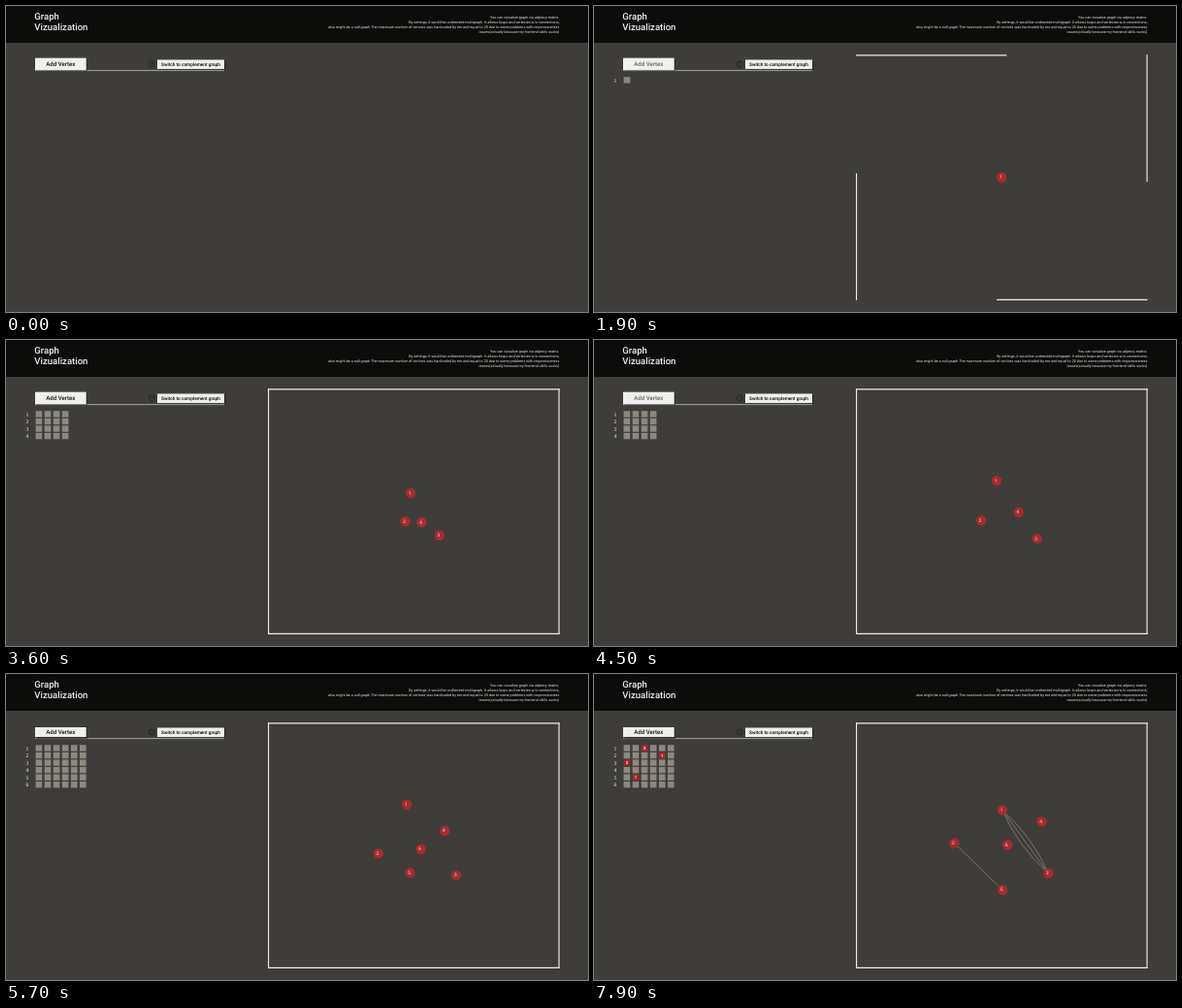
Recreate the animation shown at these times as an HTML page. Size 600 px wide and 316 px high, loop 8 s.

```html
<!DOCTYPE html>
<html lang="en">
<head>
<meta charset="utf-8">
<title>Graph Vizualization</title>
<style>
html, body { margin: 0; width: 100%; height: 100%; overflow: hidden; background: #3e3d39; }
svg { display: block; width: 100vw; height: 100vh; font-family: Roboto, sans-serif; text-rendering: geometricPrecision; }
.title { font-size: 9.55px; font-weight: 500; fill: #eee; }
.about { font-size: 3.77px; fill: #e4e4e2; text-anchor: end; }
.button text { text-anchor: middle; font-weight: 500; }
.shadow { fill: #1c1b19; opacity: .5; }
.index { font: 5.6px "Liberation Serif", serif; fill: #f4f4f0; text-anchor: middle; }
.cell { fill: #8b8880; }
.cell.on { fill: #a8262c; }
.value { font-size: 4px; font-weight: 700; fill: #fff; text-anchor: middle; }
.node circle { fill: #a92a2f; }
.node text { font-size: 4.8px; fill: #f4e6e2; text-anchor: middle; }
.edge { fill: none; stroke: #aaa9a3; stroke-width: .5; }
.frame { fill: none; stroke: #efeee7; stroke-width: 1.15; }
</style>
</head>
<body>
<svg id="stage" viewBox="0 0 600 316" preserveAspectRatio="none"></svg>
<script>
const LOOP = 8000, SPREAD_END = 5900, LINK_START = 6700, LINK_END = 7900;
const stage = document.getElementById('stage');

function add(parent, tag, attrs = {}, text = '') {
  const el = document.createElementNS('http://www.w3.org/2000/svg', tag);
  for (const key in attrs) el.setAttribute(key, attrs[key]);
  el.textContent = text;
  return parent.appendChild(el);
}
const show = (el, on) => el.setAttribute('visibility', on ? 'visible' : 'hidden');
const clamp = (v, max = 1) => Math.min(max, Math.max(0, v));
const mix = (a, b, k) => a.map((v, i) => v + (b[i] - v) * k);

// Header
add(stage, 'rect', { width: 600, height: 38, fill: '#0c0c0b' });
add(stage, 'rect', { y: 315, width: 600, height: 1, fill: '#443f47' });
['Graph', 'Vizualization'].forEach((line, i) =>
  add(stage, 'text', { x: 29.3, y: 13.8 + i * 11.6, class: 'title' }, line));
[
  'You can vizualize graph via adjency matrix.',
  'By settings, it would be undirected multigraph. It allows loops and vertecies w/o connections,',
  'also might be a null graph.The maximum number of vertices was hardcoded by me and equal to 20 due to some problems with responsiveness',
  'issues(actually because my frontend skills sucks)'
].forEach((line, i) => add(stage, 'text', { x: 570.4, y: 13.3 + i * 5, class: 'about' }, line));

// Toolbar
function addButton(x, y, width, height, size, label) {
  const g = add(stage, 'g', { class: 'button' });
  add(g, 'rect', { x: x + 1.3, y: y + 1, width, height, class: 'shadow' });
  const face = add(g, 'rect', { x, y, width, height, fill: '#efefed' });
  const text = add(g, 'text', { x: x + width / 2, y: 59.9 + size * .36, 'font-size': size }, label);
  return { face, text };
}
add(stage, 'rect', { x: 30, y: 66.3, width: 195, height: .8, fill: '#bdbcb6' });
const addVertex = addButton(30, 53.7, 52.7, 12.6, 6.1, 'Add Vertex');
addButton(156, 55.5, 69, 9.6, 4.75, 'Switch to complement graph');
add(stage, 'circle', { cx: 150.3, cy: 60, r: 3, fill: 'none', stroke: '#1d1c1a', 'stroke-width': .7 });
add(stage, 'text', { x: 150.3, y: 61.6, 'font-size': 4.6, 'text-anchor': 'middle', fill: '#1d1c1a' }, '?');

// Border sides, each grown from its own corner
const sides = ['M270 50.8H570.6', 'M570.1 50.3V303.8', 'M570.6 303.3H270', 'M270.6 303.8V50.3']
  .map(d => add(stage, 'path', { d, class: 'frame', pathLength: 1 }));

// Each vertex drifts from its start to a spread position, then settles once links pull
const vertices = [
  { born: 1200, power: 1.6, start: [420.3, 177], spread: [413.2, 134.3], settled: [421, 140.6] },
  { born: 2600, power: 1.1, start: [425.9, 188], spread: [382, 185.3], settled: [371.4, 174.6] },
  { born: 2900, power: 1.6, start: [437.6, 198.4], spread: [464.6, 208], settled: [468.4, 205.8] },
  { born: 3500, power: .85, start: [427.5, 189.3], spread: [455.8, 158.3], settled: [461.5, 152.4] },
  { born: 4700, power: 1, start: [425.8, 184], spread: [414.8, 209.4], settled: [421.2, 223] },
  { born: 5500, power: 1.5, start: [427, 184], spread: [428.1, 179.3], settled: [426.4, 176.5] }
];

function place({ born, power, start, spread, settled }, t) {
  const from = Math.max(born, vertices[1].born); // a lone vertex rests
  const p = clamp((t - from) / (SPREAD_END - from));
  const pull = clamp((t - LINK_START) / (LINK_END - LINK_START));
  return mix(mix(start, spread, 1 - (1 - p) ** power), settled, pull);
}

// Links gain one line per tick up to their limit
const links = [
  { ends: [1, 4], since: 6800, limit: 1 },
  { ends: [0, 2], since: 7700, limit: 3 }
];
const countAt = (link, t) => clamp(Math.floor((t - link.since) / 100) + 1, link.limit);
const bendOf = i => Math.ceil(i / 2) * (i % 2 ? 4.5 : -4.5);
for (const link of links) {
  link.paths = Array.from({ length: link.limit }, () => add(stage, 'path', { class: 'edge' }));
}

const nodes = vertices.map((_, i) => {
  const g = add(stage, 'g', { class: 'node' });
  add(g, 'circle', { r: 5.2 });
  add(g, 'text', { x: -1, y: 1.4 }, i + 1);
  return g;
});

// Adjacency matrix
const cells = [];
const indices = vertices.map((vertex, row) => {
  const y = 76.5 + row * 7.55;
  vertices.forEach((other, col) => {
    const x = 33.9 + col * 9.08;
    cells.push({
      box: add(stage, 'rect', { x: x - 3.3, y: y - 3.2, width: 6.6, height: 6.4 }),
      value: add(stage, 'text', { x, y: y + 1.5, class: 'value' }),
      born: Math.max(vertex.born, other.born),
      link: links.find(({ ends }) => row !== col && ends.includes(row) && ends.includes(col))
    });
  });
  return add(stage, 'text', { x: 21.8, y: y + 2.1, class: 'index' }, row + 1);
});

function drawLink(link, [ax, ay], [bx, by], count) {
  const length = Math.hypot(bx - ax, by - ay);
  link.paths.forEach((path, i) => {
    const bend = bendOf(i) * 2 / length;
    const cx = (ax + bx) / 2 + (by - ay) * bend;
    const cy = (ay + by) / 2 - (bx - ax) * bend;
    path.setAttribute('d', `M${ax} ${ay}Q${cx} ${cy} ${bx} ${by}`);
    show(path, i < count);
  });
}

function draw(t) {
  const grow = clamp((t - 1300) / 1160);
  for (const side of sides) {
    side.setAttribute('stroke-dasharray', `${grow} 2`);
    show(side, grow > 0);
  }

  const done = t >= 5700;
  const clicked = vertices.some(({ born }) => t > born && t < born + 200);
  const hover = t >= 1200 && !done && !clicked;
  addVertex.text.setAttribute('fill', hover ? '#666664' : '#111');
  addVertex.face.setAttribute('y', done ? 55 : 53.7);
  addVertex.face.setAttribute('height', done ? 10 : 12.6);

  const points = vertices.map(vertex => place(vertex, t));
  vertices.forEach(({ born }, i) => {
    nodes[i].setAttribute('transform', `translate(${points[i]})`);
    show(nodes[i], t >= born);
    show(indices[i], t >= born);
  });

  for (const { box, value, born, link } of cells) {
    const count = link ? countAt(link, t) : 0;
    box.setAttribute('class', count ? 'cell on' : 'cell');
    value.textContent = count || '';
    show(box, t >= born);
  }

  for (const link of links) {
    const [a, b] = link.ends;
    drawLink(link, points[a], points[b], countAt(link, t));
  }
}

const begin = performance.now();
function loop() {
  const ms = (performance.now() - begin) % LOOP;
  draw(Math.floor(ms / 100) * 100);
  requestAnimationFrame(loop);
}
loop();
</script>
</body>
</html>
```
